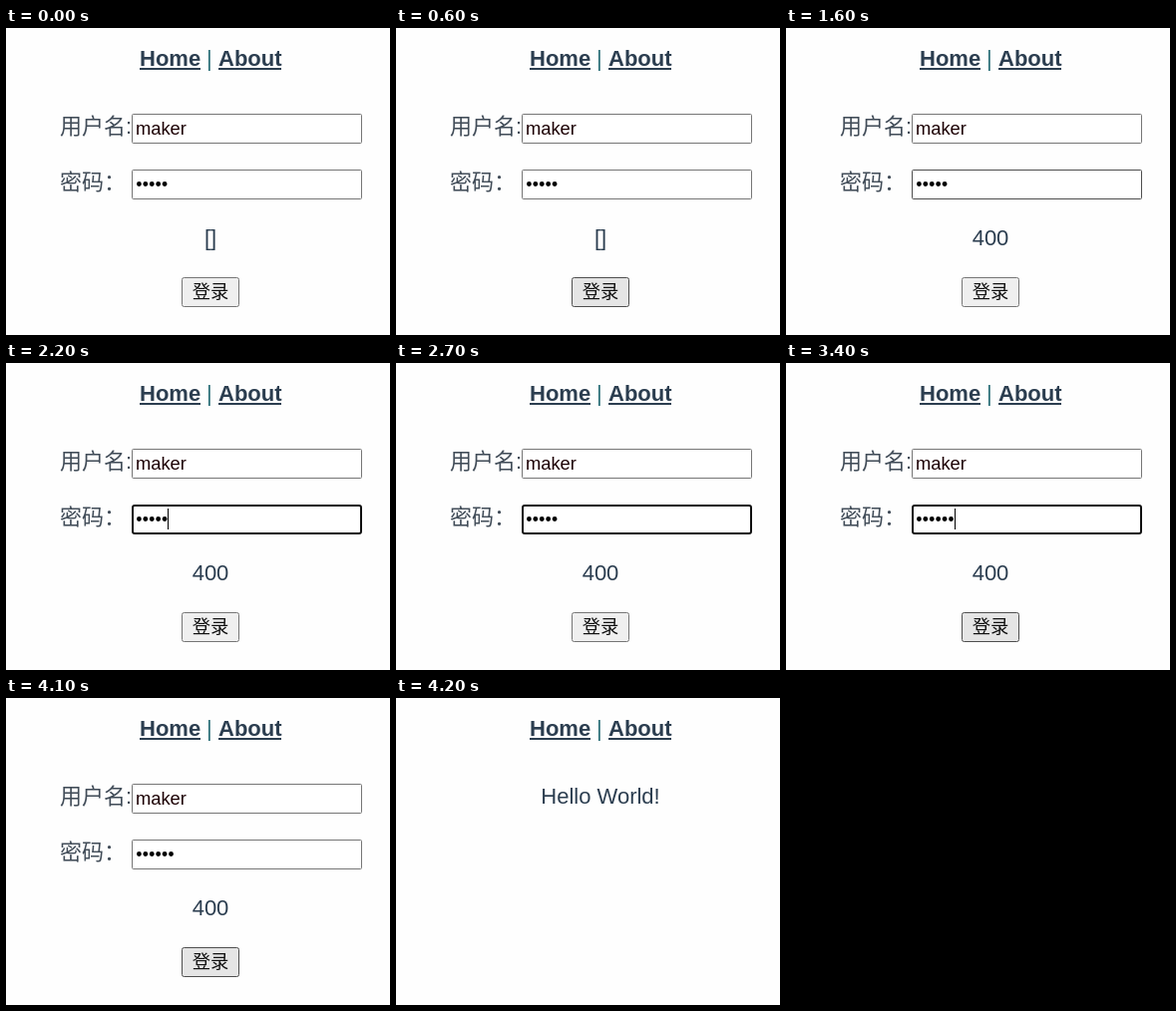
Write an HTML page with a canvas that moves like this. It is 385 px wide and 308 px high and loops after 6000 ms.

```html
<!DOCTYPE html>
<html lang="zh">
<head>
<meta charset="utf-8">
<title>Login</title>
<style>
html, body { margin: 0; width: 100%; height: 100%; overflow: hidden; background: #fefefe; }
canvas { display: block; }
</style>
</head>
<body>
<canvas id="stage" width="385" height="308"></canvas>
<script>
const ctx = document.getElementById('stage').getContext('2d');
const LOOP = 6000;
const INK = '#2c3e50';
const LATIN = '"Liberation Sans", Arial, sans-serif';
const CJK = '"Noto Sans CJK SC", "Noto Sans CJK", sans-serif';
const BUTTON = {
  normal: ['#efefef', '#767676'],
  hover: ['#e5e5e5', '#4f4f4f'],
  active: ['#f5f5f5', '#8d8d8d']
};

const within = (t, from, to) => t >= from && t < to;

function text(str, x, y, font, color = INK, align = 'left') {
  ctx.font = font;
  ctx.fillStyle = color;
  ctx.textAlign = align;
  ctx.fillText(str, x, y);
}

function box(x, y, w, h, fill, border, line = 1, radius = 1) {
  const half = line / 2;
  ctx.beginPath();
  ctx.roundRect(x + half, y + half, w - line, h - line, radius);
  ctx.fillStyle = fill;
  ctx.fill();
  ctx.lineWidth = line;
  ctx.strokeStyle = border;
  ctx.stroke();
}

function link(str, x, width) {
  text(str, x, 38, `bold 22px ${LATIN}`);
  ctx.fillRect(x, 40, width, 2);
}

function drawNav() {
  link('Home', 134, 61);
  text('|', 201, 38, `22px ${LATIN}`, '#2b6f78');
  link('About', 213, 63);
}

function drawPassword(t) {
  const focused = within(t, 2200, 4100);
  const hovered = within(t, 1600, 2200);
  const count = t < 3100 ? 5 : 6;
  const step = 6.42;

  if (focused) box(126, 142, 231, 30, '#fff', '#101010', 2, 2);
  else box(126, 142, 231, 30, '#fff', hovered ? '#4f4f4f' : '#767676');

  ctx.fillStyle = '#000';
  for (let i = 0; i < count; i++) {
    ctx.beginPath();
    ctx.arc(130.2 + (i + 0.5) * step, 156.5, 2.4, 0, Math.PI * 2);
    ctx.fill();
  }
  if (within(t, 2200, 2700) || within(t, 3100, 3600)) {
    ctx.fillRect(Math.round(130 + count * step), 146, 1, 21);
  }
}

function buttonState(t) {
  if (within(t, 1000, 1100)) return 'active';
  const over = within(t, 600, 1500) || within(t, 3400, 3500) || within(t, 3800, 4200);
  return over ? 'hover' : 'normal';
}

function drawForm(t) {
  text('用户名', 54, 106, `300 22px ${CJK}`, '#414c58');
  text(':', 120, 106, `22px ${LATIN}`, '#414c58');
  text('密码：', 54, 162, `300 22px ${CJK}`, '#414c58');

  box(126, 86, 231, 30, '#fff', '#767676');
  text('maker', 130, 107, `18.33px ${LATIN}`, '#1c0004');
  drawPassword(t);

  text(t < 1100 ? '[]' : '400', 205, 218, `22px ${LATIN}`, INK, 'center');

  const [fill, border] = BUTTON[buttonState(t)];
  box(176, 250, 58, 30, fill, border, 1, 2);
  text('登录', 205, 271, `300 18.33px ${CJK}`, '#111', 'center');
}

function draw(t) {
  ctx.fillStyle = '#fefefe';
  ctx.fillRect(0, 0, 385, 308);
  drawNav();
  if (t < 4200) drawForm(t);
  else text('Hello World!', 205, 106, `22px ${LATIN}`, INK, 'center');
}

function tick() {
  draw(performance.now() % LOOP);
  requestAnimationFrame(tick);
}
tick();
</script>
</body>
</html>
```
